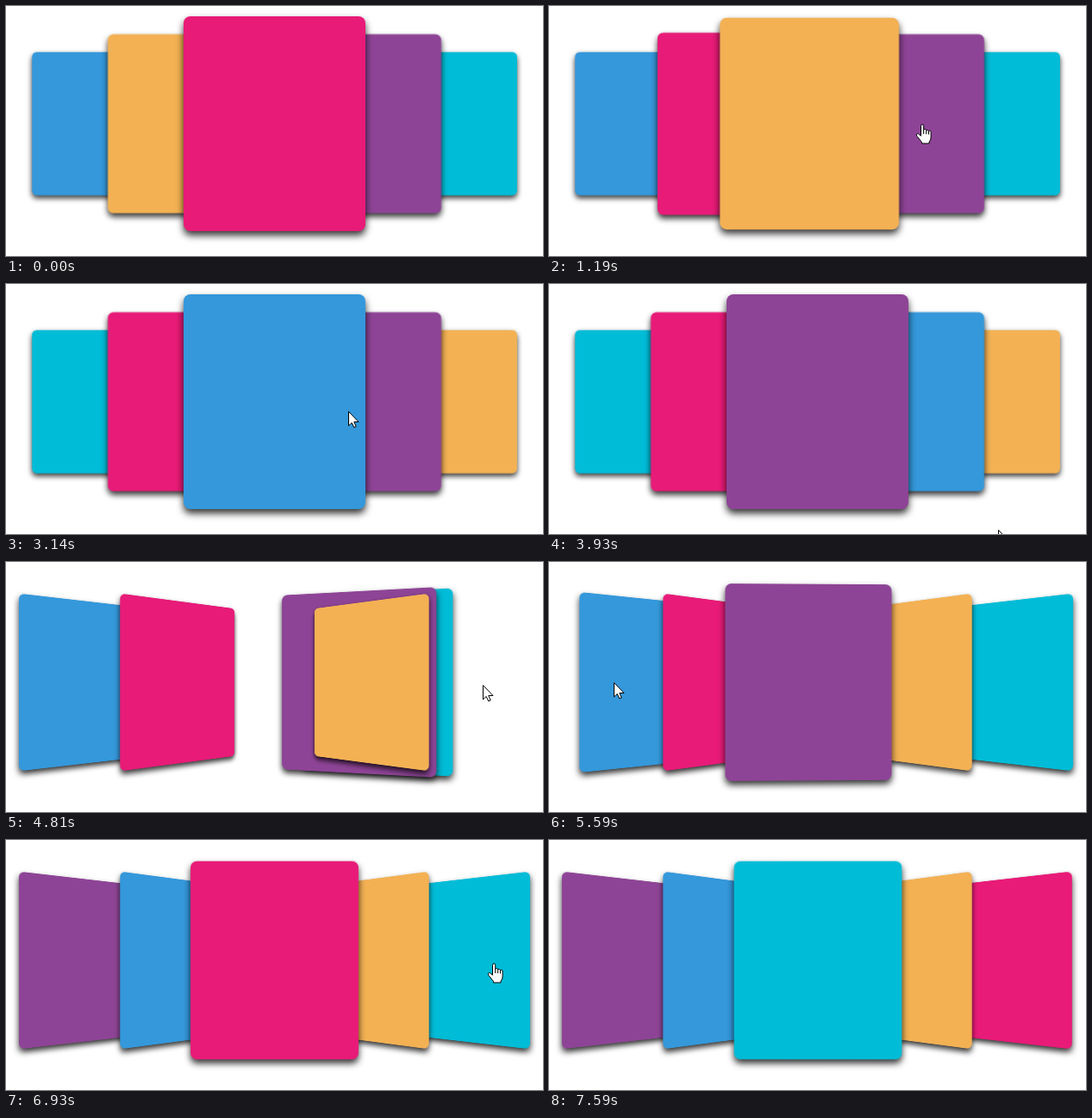
Animation, 623 px wide and 291 px high, one loop 7810 ms. Source, as an HTML page:

```html
<!DOCTYPE html>
<html lang="en">
<head>
<meta charset="utf-8">
<title>Card carousels</title>
<style>
html, body { margin: 0; width: 100%; height: 100%; overflow: hidden; background: #fff; }
.card {
  position: absolute; left: 206px; width: 211px; height: 250px;
  border-radius: 8px; box-shadow: 0 5px 9px rgba(0, 0, 0, .8);
}
svg {
  position: absolute; left: 0; top: 0; z-index: 9; overflow: visible; pointer-events: none;
  fill: #fff; stroke: #000; stroke-linejoin: round;
}
</style>
</head>
<body>
<svg id="cursor" width="1" height="1">
  <path id="arrow" d="M.5 .5V17L4.2 13.5 6.8 19 9.2 18 6.8 12.5H12Z"/>
  <g id="hand">
    <path d="M-1.5 1.5a1.6 1.6 0 0 1 3.2 0V6.6a1.5 1.5 0 0 1 3 .6 1.5 1.5 0 0 1 2.8 .7 1.4 1.4 0 0 1 2.6 .8V15q0 3.5-2 5V22H-.5V20.5L-6.2 13.4q-1.2-2 .3-2.7 1.5-.4 2.8 1.3L-1.5 13.2Z"/>
    <path fill="none" d="M1.7 6.6v4.4M4.7 7.2v4M7.5 8v3.5"/>
  </g>
</svg>
<script>
const LOOP = 7810, MOVE = 500, CENTER = 2;
const colors = { blue: '#3498db', pink: '#e81b78', cyan: '#00bcd7', purple: '#8e4496', orange: '#f3b153' };

// Slots run from far left (0) to far right (4). Each stop of the pointer is
// { t, x, y }; one with a slot is a click that swaps that card with the middle one.
const scenes = [
  {
    start: 0, y: 137, lag: 0, order: ['blue', 'orange', 'pink', 'purple', 'cyan'],
    pose: n => ({ x: 105.5 * n, z: 0, turn: 0, scale: 1 - Math.abs(n) / 6 }),
    stops: [
      { t: 0, x: 437, y: 296 },
      { t: 870, x: 155, y: 140, slot: 1 },
      { t: 1190, x: 433, y: 138 },
      { t: 1710, x: 536, y: 143, slot: 4 },
      { t: 2590, x: 102, y: 130, slot: 0 },
      { t: 3410, x: 470, y: 152, slot: 3 },
      { t: 4150, x: 530, y: 310 }
    ]
  },
  {
    start: 4150, y: 140.4, lag: 33, order: ['blue', 'pink', 'cyan', 'orange', 'purple'],
    pose: n => ({ x: 142 * n, z: n ? -200 : -50, turn: -45 * Math.sign(n), scale: 1 }),
    stops: [
      { t: 4150, x: 586, y: 296 },
      { t: 4635, x: 573, y: 143, slot: 4 },
      { t: 5530, x: 75, y: 140, slot: 0 },
      { t: 6320, x: 178, y: 138, slot: 1 },
      { t: 7120, x: 598, y: 145, slot: 4 },
      { t: 7600, x: 596, y: 310 },
      { t: LOOP, x: 596, y: 310 }
    ]
  }
];

const cursor = document.getElementById('cursor');
const hand = document.getElementById('hand');
const arrow = document.getElementById('arrow');

const cards = {};
for (const name in colors) {
  const el = cards[name] = document.createElement('div');
  el.className = 'card';
  el.style.background = colors[name];
  document.body.append(el);
}

const mix = (a, b, k) => a + (b - a) * k;
const clamp = k => Math.min(1, Math.max(0, k));
const smooth = k => k * k * (3 - 2 * k);

// CSS "ease": cubic-bezier(.25, .1, .25, 1)
function ease(t) {
  let lo = 0, hi = 1;
  for (let i = 0; i < 20; i++) {
    const u = (lo + hi) / 2, v = 1 - u;
    if (.75 * u * v * v + .75 * u * u * v + u ** 3 < t) lo = u; else hi = u;
  }
  const v = 1 - lo;
  return .3 * lo * v * v + 3 * lo * lo * v + lo ** 3;
}

function place(el, scene, from, to, k) {
  const a = scene.pose(from - CENTER), b = scene.pose(to - CENTER);
  const at = key => mix(a[key], b[key], k);
  const layer = slot => 3 - Math.abs(slot - CENTER);
  el.clickable = to !== CENTER;
  el.style.top = scene.y - 125 + 'px';
  el.style.zIndex = Math.round(mix(layer(from), layer(to), k));
  el.style.transform = `perspective(600px) translate3d(${at('x')}px, 0, ${at('z')}px) ` +
    `rotateY(${at('turn')}deg) scale(${at('scale')})`;
}

function drawCards(scene, t) {
  let order = scene.order, before = order, last = scene.start;
  for (const stop of scene.stops) {
    if (!stop.slot && stop.slot !== 0 || stop.t > t) continue;
    before = order;
    order = [...order];
    [order[stop.slot], order[CENTER]] = [order[CENTER], order[stop.slot]];
    last = stop.t;
  }
  order.forEach((name, to) => {
    const wait = to === CENTER ? 0 : scene.lag;
    place(cards[name], scene, before.indexOf(name), to, ease(clamp((t - last - wait) / MOVE)));
  });
}

// The pointer rests briefly around each stop and glides in between.
function drawCursor({ stops }, t) {
  const i = stops.findIndex(s => s.t > t), a = stops[i - 1], b = stops[i];
  const k = smooth(clamp(((t - a.t) / (b.t - a.t) - .1) / .8));
  const x = mix(a.x, b.x, k), y = mix(a.y, b.y, k);
  const under = document.elementFromPoint(x, y);
  const clickable = under && under.clickable;
  hand.style.display = clickable ? '' : 'none';
  arrow.style.display = clickable ? 'none' : '';
  cursor.style.transform = `translate(${Math.round(x)}px, ${Math.round(y)}px)`;
}

const begin = performance.now();

function frame() {
  const t = Math.max(0, performance.now() - begin) % LOOP;
  const scene = scenes[t < scenes[1].start ? 0 : 1];
  drawCards(scene, t);
  drawCursor(scene, t);
  requestAnimationFrame(frame);
}
frame();
</script>
</body>
</html>
```
